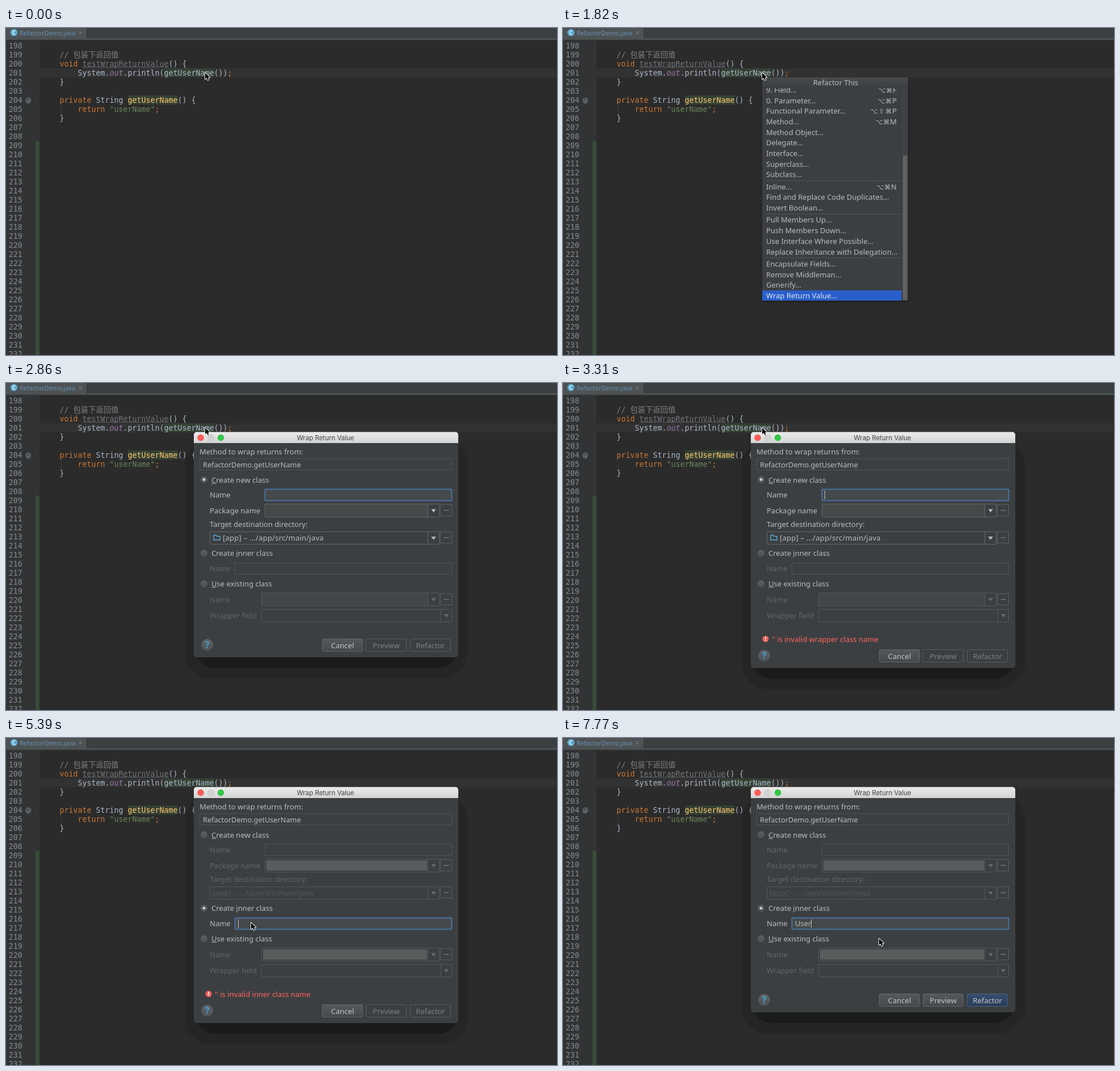
Animation of 971 by 577 pixels, one loop 8 s. Source, as an HTML page with a canvas:

```html
<!DOCTYPE html>
<html lang="en">
<head>
<meta charset="utf-8">
<title>Refactor demo</title>
<style>
html, body { margin: 0; width: 971px; height: 577px; overflow: hidden; background: #2b2b2b; }
canvas { display: block; }
</style>
</head>
<body>
<canvas id="stage" width="971" height="577"></canvas>
<script>
const LOOP = 8000;
const ctx = document.getElementById('stage').getContext('2d');
const UI = '13px "Noto Sans", "DejaVu Sans", sans-serif';
const SYMBOL = '11.5px "DejaVu Sans", sans-serif';
const MONO = '13.29px "DejaVu Sans Mono", "Noto Sans CJK SC", "Noto Sans CJK", monospace';
const PANEL = '#3c3f41', FIELD = '#45494a', EDGE = '#646768', DIM_EDGE = '#515456';
const TEXT = '#bbbbbb', DIM = '#626567';

// ---------- helpers ----------
function rect(x, y, w, h, color) {
  ctx.fillStyle = color;
  ctx.fillRect(x, y, w, h);
}
function round(x, y, w, h, r, fill, stroke, width = 1) {
  ctx.beginPath();
  ctx.roundRect(x, y, w, h, r);
  if (fill) { ctx.fillStyle = fill; ctx.fill(); }
  if (stroke) { ctx.strokeStyle = stroke; ctx.lineWidth = width; ctx.stroke(); }
}
function disc(x, y, r, fill, stroke, width = 1) {
  ctx.beginPath();
  ctx.arc(x, y, r, 0, Math.PI * 2);
  if (fill) { ctx.fillStyle = fill; ctx.fill(); }
  if (stroke) { ctx.strokeStyle = stroke; ctx.lineWidth = width; ctx.stroke(); }
}
function poly(points, fill) {
  ctx.beginPath();
  points.forEach(([x, y]) => ctx.lineTo(x, y));
  ctx.closePath();
  ctx.fillStyle = fill;
  ctx.fill();
}
function text(str, x, y, color = TEXT, font = UI, align = 'left') {
  ctx.font = font;
  ctx.textAlign = align;
  ctx.fillStyle = color;
  ctx.fillText(str, x, y);
}
function vertical(y, h, top, bottom) {
  const g = ctx.createLinearGradient(0, y, 0, y + h);
  g.addColorStop(0, top);
  g.addColorStop(1, bottom);
  return g;
}
// last entry of [time, ...values] that has begun
function at(track, t) {
  let now = track[0];
  for (const key of track) if (key[0] <= t) now = key;
  return now;
}

// ---------- editor ----------
const KEY = '#cc7832', CODE = '#a9b7c6';
const SOURCE = {
  199: [4, ['// 包装下返回值', '#808080']],
  200: [4, ['void ', KEY], ['testWrapReturnValue', '#72737a'], ['() {', CODE]],
  201: [8, ['System.', CODE], ['out', '#9876aa', 'italic '], ['.println(getUserName())', CODE], [';', KEY]],
  202: [4, ['}', CODE]],
  204: [4, ['private ', KEY], ['String ', CODE], ['getUserName', '#ffc66d'], ['() {', CODE]],
  205: [8, ['return ', KEY], ['"userName"', '#6a8759'], [';', KEY]],
  206: [4, ['}', CODE]]
};

function drawTab() {
  rect(0, 0, 971, 21, PANEL);
  rect(0, 0, 142, 21, '#4e5254');
  rect(0, 18, 971, 3, '#4b5052');
  rect(142, 0, 1, 18, '#323537');
  rect(0, 21, 971, 1, '#2d2f30');
  disc(14, 8, 6.3, '#58a8cf');
  text('C', 14, 11.7, '#e4f1f7', 'bold 10px "Noto Sans", sans-serif', 'center');
  text('RefactorDemo.java', 24, 12.5, '#6591b3', '11px "Noto Sans", sans-serif');
  ctx.strokeStyle = '#85898b';
  ctx.lineWidth = 1;
  ctx.beginPath();
  ctx.moveTo(128.5, 5.5); ctx.lineTo(134, 11);
  ctx.moveTo(134, 5.5); ctx.lineTo(128.5, 11);
  ctx.stroke();
}

function drawEditor(caret) {
  rect(0, 0, 971, 577, '#2b2b2b');
  rect(0, 21, 59, 556, '#313335');
  rect(59, 71, 912, 16, '#323232');
  rect(52, 199, 7, 378, '#374d37');
  rect(279, 71, 88, 16, '#344134');
  rect(215, 119, 88, 16, '#344134');
  rect(97, 135, 1, 16, '#3a3a3a');
  for (let n = 198; n <= 232; n++) {
    const y = 36 + (n - 198) * 16;
    text(n, 4.7, y, '#888b8d', MONO);
    if (!SOURCE[n]) continue;
    const [indent, ...parts] = SOURCE[n];
    let x = 62.6 + indent * 8;
    for (const [str, color, style = ''] of parts) {
      text(str, x, y, color, style + MONO);
      x += str.length * 8;
    }
  }
  text('@', 34, 131, '#a4a8aa', '10.5px "DejaVu Sans", sans-serif');
  ctx.strokeStyle = '#6b6d72';
  ctx.lineWidth = 1;
  ctx.beginPath();
  for (let x = 135; x <= 287; x += 2) ctx.lineTo(x, x % 4 === 3 ? 70 : 68.3);
  ctx.stroke();
  if (caret) rect(351, 71, 1.6, 16, '#c4c4c4');
  drawTab();
}

// ---------- popup menu ----------
const MENU = [
  ['1. Rename...', 'F2'], ['2. Change Signature...', '⌘F6'], ['3. Make Static...'], '-',
  ['4. Move...', 'F6'], ['5. Copy...', 'F5'], ['6. Safe Delete...', '⌘⌦'], 'Extract',
  ['7. Variable...', '⌥⌘V'], ['8. Constant...', '⌥⌘C'], ['9. Field...', '⌥⌘F'],
  ['0. Parameter...', '⌥⌘P'], ['Functional Parameter...', '⌥⇧⌘P'], ['Method...', '⌥⌘M'],
  ['Method Object...'], ['Delegate...'], ['Interface...'], ['Superclass...'], ['Subclass...'], '-',
  ['Inline...', '⌥⌘N'], ['Find and Replace Code Duplicates...'], ['Invert Boolean...'], '-',
  ['Pull Members Up...'], ['Push Members Down...'], ['Use Interface Where Possible...'],
  ['Replace Inheritance with Delegation...'], '-',
  ['Encapsulate Fields...'], ['Remove Middleman...'], ['Generify...'], ['Wrap Return Value...']
];
const ROW = 18.7, SEP = 2.6, HEADER = 16.9;
const rowHeight = item => item === '-' ? SEP : typeof item === 'string' ? HEADER : ROW;
const MENU_H = MENU.reduce((sum, item) => sum + rowHeight(item), 0);

// right-aligned: letters first, then each modifier key in an even cell
function shortcut(keys, right, y, color) {
  const [, mods, letters] = keys.match(/^([^\w]*)(\w*)$/);
  text(letters, right, y, color, UI, 'right');
  let x = right - ctx.measureText(letters).width;
  for (const mod of [...mods].reverse()) {
    text(mod, x - 6.3, y, color, SYMBOL, 'center');
    x -= 12.6;
  }
}

function drawMenu(atEnd, faded) {
  ctx.save();
  ctx.shadowColor = 'rgba(0,0,0,.3)';
  ctx.shadowBlur = 5;
  ctx.shadowOffsetY = 2;
  rect(351, 87, 257, 394, PANEL);
  ctx.restore();
  rect(351, 87, 257, 19, vertical(87, 19, '#474a4c', '#3b3e40'));
  text('Refactor This', 480.5, 100.8, TEXT, UI, 'center');

  const view = 375, scroll = atEnd ? MENU_H - view : 0;
  const selected = atEnd ? MENU.length - 1 : 0;
  ctx.save();
  ctx.beginPath();
  ctx.rect(351, 106, 257, view);
  ctx.clip();
  let y = 106.4 - scroll;
  MENU.forEach((item, i) => {
    const h = rowHeight(item);
    if (item === '-') {
      rect(358, Math.round(y + 1), 238, 1, '#515456');
    } else if (typeof item === 'string') {
      rect(351, Math.round(y + 7.5), 96, 1, '#515456');
      rect(499, Math.round(y + 7.5), 97, 1, '#515456');
      text(item, 473, y + 13, '#818486', '500 ' + UI, 'center');
    } else {
      const on = i === selected;
      if (on) rect(351, Math.round(y), 245.5, 19, '#2a5fcb');
      text(item[0], 358, y + 14.2, on ? '#dfe4ee' : TEXT);
      if (item[1]) shortcut(item[1], 588, y + 14.2, on ? '#c3cde0' : TEXT);
    }
    y += h;
  });
  const thumb = view * view / MENU_H;
  rect(597, 106, 11, view, '#3f4244');
  round(599, atEnd ? 480 - thumb : 107.5, 7.5, thumb, 1, faded ? '#606364' : '#686b6c');
  ctx.restore();
}

// ---------- dialog ----------
function field(x, y, w, h, mode) {
  const focus = mode === 'focus', on = mode !== 'off';
  const edge = focus ? '#4773a0' : on ? EDGE : DIM_EDGE;
  round(x + .5, y + .5, w - 1, h - 1, focus ? 1.5 : 0, on ? FIELD : PANEL, edge, focus ? 2 : 1);
}
function combo(x, y, w, h, on, split, fill) {
  round(x + .5, y + .5, w - 1, h - 1, 1.5, PANEL, on ? EDGE : '#55585a');
  if (fill) rect(x + 1, y + 1, split - x - 1, h - 2, fill);
  rect(split, y + 1, 1, h - 2, on ? EDGE : '#55585a');
  const cx = (split + x + w) / 2, cy = y + h / 2;
  poly([[cx - 4.2, cy - 2.6], [cx + 4.2, cy - 2.6], [cx, cy + 3.4]], on ? '#b4b6b7' : '#66696b');
}
function more(y) {
  rect(765, y, 21, 22, PANEL);
  ctx.strokeStyle = '#5c5f61';
  ctx.lineWidth = 1;
  ctx.strokeRect(765.5, y + .5, 20, 20);
  for (let i = 0; i < 3; i++) rect(772 + i * 3, y + 10, 1.4, 1.5, '#aaacad');
}
function radio(y, label, mnemonic, checked, pressed) {
  if (pressed) disc(349, y, 7.2, '#53585b', '#43698f', 2);
  else disc(349, y, 5.3, vertical(y - 5, 10, '#5d6163', '#4b4e50'), '#6a6d6f', .8);
  if (checked) disc(349, y, 2.4, '#d2d4d5');
  text(label, 362, y + 5);
  const start = ctx.measureText(label.slice(0, mnemonic)).width;
  rect(362 + start, Math.round(y + 6), ctx.measureText(label[mnemonic]).width, 1, '#a8a8a8');
}
function button(x, y, label, mode) {
  const fill = {
    on: ['#55595b', '#44484a'], off: [PANEL, PANEL], main: ['#354f70', '#293c57']
  }[mode];
  const edge = { on: '#626567', off: '#5a5d5f', main: '#48617f' }[mode];
  round(x + .5, y - 11, 71, 22, 2, vertical(y - 11, 23, ...fill), edge);
  text(label, x + 36, y + 5, mode === 'off' ? '#7d8082' : '#c4c6c7', UI, 'center');
}
function folder(x, y) {
  ctx.strokeStyle = '#58a9d6';
  ctx.lineWidth = 1.5;
  ctx.beginPath();
  ctx.moveTo(x + 1, y + 1);
  ctx.lineTo(x + 5, y + 1);
  ctx.lineTo(x + 6.5, y + 3);
  ctx.lineTo(x + 12, y + 3);
  ctx.lineTo(x + 12, y + 9.5);
  ctx.lineTo(x + 1, y + 9.5);
  ctx.closePath();
  ctx.stroke();
}

function drawDialog(s) {
  const bottom = s.error ? 503 : 484;
  round(294, 92, 518, bottom + 36 - 92, 60, 'rgba(0,0,0,.025)');
  round(315, 98, 500, bottom + 38 - 98, 48, 'rgba(0,0,0,.11)');
  round(334, 106, 462, bottom + 19 - 106, 34, 'rgba(0,0,0,.27)');

  round(331, 86.5, 466, bottom - 86.5, 5, PANEL);
  round(331, 86.5, 466, 19.5, [5, 5, 0, 0], vertical(86.5, 19.5, '#ececec', '#d3d3d3'));
  disc(343, 96.5, 5.4, '#fc5b57', '#e2463f', .6);
  disc(361, 96.5, 5.4, '#d3d3d3', '#bcbcbc', .8);
  disc(378.5, 96.5, 5.4, '#2fc944', '#24ae36', .6);
  text('Wrap Return Value', 563, 100.7, '#454545', '11.5px Inter, sans-serif', 'center');

  text('Method to wrap returns from:', 341, 125.7);
  field(341, 133, 445, 21, 'off');
  text('RefactorDemo.getUserName', 347, 148.7, TEXT, UI.replace('13px', '12.7px'));

  const fresh = !s.inner, label = fresh ? TEXT : DIM;
  radio(170.5, 'Create new class', 0, fresh, false);
  text('Name', 359, 202, label);
  field(456, 187, 330, 21, !fresh ? 'off' : s.pressed ? 'on' : 'focus');
  if (fresh && s.caret) rect(461, 190, 1, 15, '#c4c4c4');
  text('Package name', 359, 229.7, label);
  combo(456, 213, 308, 24, fresh, 743, fresh ? FIELD : null);
  if (!fresh) rect(459, 216, 283, 18, '#595b5c');
  more(214);
  text('Target destination directory:', 359, 254, label);
  combo(359, 262, 405, 23, fresh, 743);
  if (fresh) folder(365, 267.5);
  ctx.letterSpacing = '0.23px';
  text('[app] – .../app/src/main/java', fresh ? 382 : 364, 277.7, fresh ? TEXT : '#55585a');
  ctx.letterSpacing = '0px';
  more(262);

  radio(300.3, 'Create inner class', 7, s.inner, s.pressed);
  text('Name', 359, 332, s.inner ? TEXT : DIM);
  field(403, 317, 383, 21, s.inner ? 'focus' : 'off');
  if (s.inner) {
    text(s.typed, 409, 332);
    const end = 409 + ctx.measureText(s.typed).width;
    if (s.caret) rect(Math.round(end), 320, 1, 15, '#c4c4c4');
  }

  radio(354, 'Use existing class', 0, false, false);
  text('Name', 359, 386.5, DIM);
  combo(450, 370, 314, 24, false, 743, s.inner ? null : '#424648');
  if (s.inner) rect(453, 373, 289, 18, '#595b5c');
  more(371);
  text('Wrapper field', 359, 415, DIM);
  combo(450, 399, 336, 23, false, 766);

  if (s.error) {
    disc(357, 451.5, 5.5, '#f5605c');
    rect(356.2, 448, 1.7, 4.5, '#ffffff');
    rect(356.2, 453.6, 1.7, 1.6, '#ffffff');
    text(`'' is invalid ${s.inner ? 'inner' : 'wrapper'} class name`, 368, 456.7, '#ff6560');
  }
  const y = bottom - 21.5;
  disc(354.5, y - .5, 9.8, vertical(y - 10, 20, '#60666a', '#4b5053'), '#63686b', .8);
  text('?', 354.5, y + 5, '#42a5dc', 'bold 16px "Noto Sans", sans-serif', 'center');
  button(557, y, 'Cancel', 'on');
  button(634, y, 'Preview', s.typed ? 'on' : 'off');
  button(712, y, 'Refactor', s.typed ? 'main' : 'off');
}

// ---------- pointer ----------
const POINTER = [
  [0, 351, 79], [4210, 355, 98], [4360, 374, 185], [4510, 395, 272], [4660, 402, 298],
  [5390, 432, 326], [5540, 512, 392], [5690, 612, 448], [5840, 660, 466],
  [6130, 656, 462], [6280, 630, 435], [6430, 590, 398], [6580, 564, 365], [6730, 557, 354]
];
function drawPointer(x, y) {
  ctx.save();
  ctx.translate(x, y);
  ctx.beginPath();
  [[0, 0], [0, 11.2], [2.6, 8.8], [4.6, 13], [6.5, 12.1], [4.6, 8.2], [8.2, 8.2]]
    .forEach(([px, py]) => ctx.lineTo(px, py));
  ctx.closePath();
  ctx.lineJoin = 'round';
  ctx.lineWidth = 1.9;
  ctx.strokeStyle = '#f4f4f4';
  ctx.stroke();
  ctx.fillStyle = '#000';
  ctx.fill();
  ctx.restore();
}

// ---------- timeline ----------
const CARET = [[0, 0], [450, 1], [930, 0], [2720, 1], [2860, 0], [3310, 1], [3910, 0],
  [4360, 1], [4950, 0], [5100, 1], [5690, 0], [6130, 1], [6730, 0], [7180, 1]];
const TYPED = [[0, ''], [7180, 'U'], [7470, 'Us'], [7620, 'Use'], [7770, 'User']];

function draw(t) {
  const caret = at(CARET, t)[1];
  drawEditor(caret && t < 2860);
  if (t >= 930 && t < 2720) drawMenu(t >= 1820, t >= 1520);
  if (t >= 2860) {
    drawDialog({
      caret,
      inner: t >= 5100,
      pressed: t >= 4950 && t < 5100,
      error: t >= 3310 && t < 7470,
      typed: at(TYPED, t)[1]
    });
  }
  const [, x, y] = at(POINTER, t);
  drawPointer(x, y);
}

function tick() {
  draw(performance.now() % LOOP);
  requestAnimationFrame(tick);
}
tick();
</script>
</body>
</html>
```
